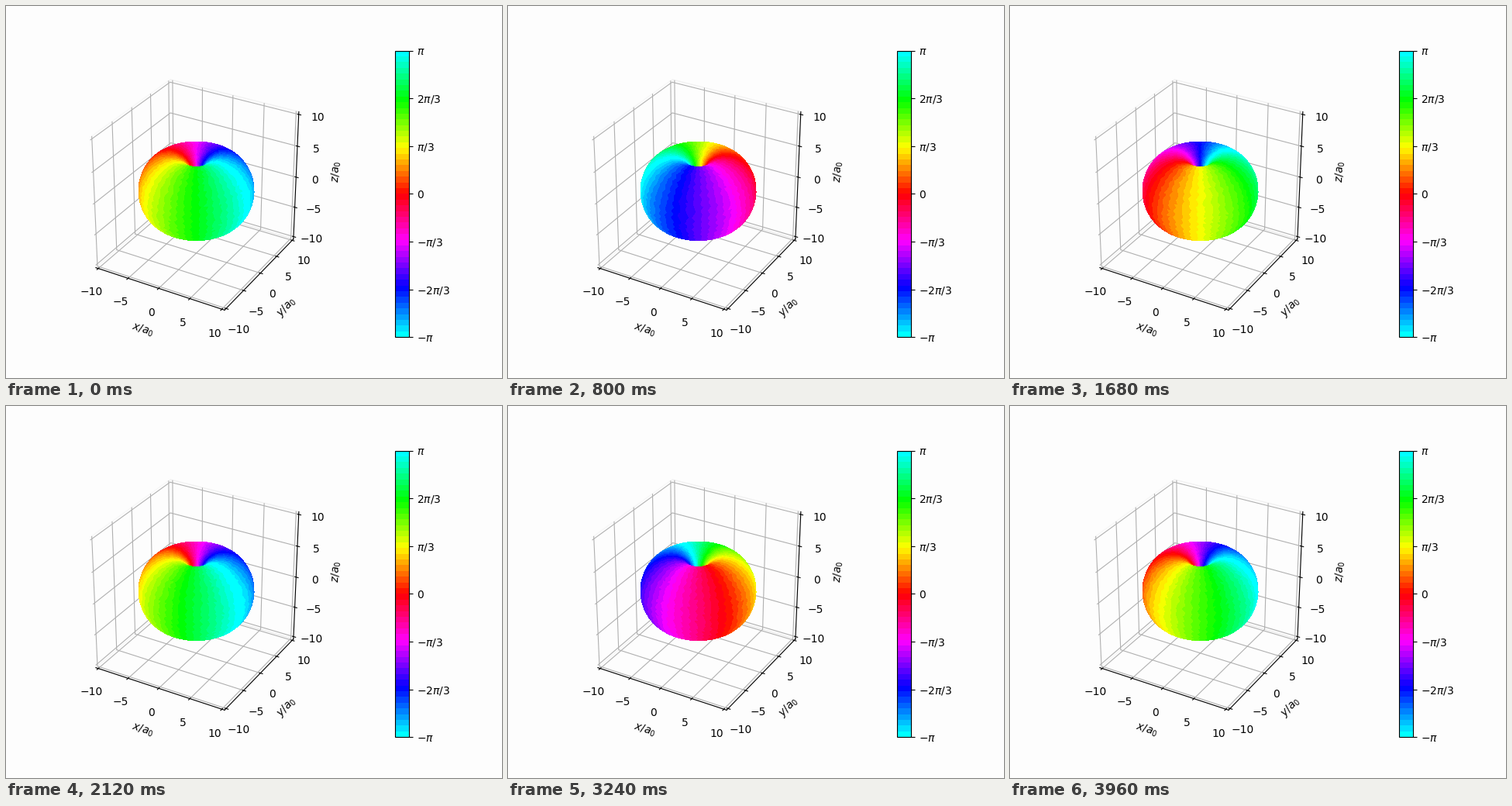
Recreate the animation shown at these times as a matplotlib script. Size 640x480 px, loop 4000 ms.

```python
import colorsys
import numpy as np
import matplotlib.pyplot as plt
from matplotlib.animation import FuncAnimation
from matplotlib.cm import ScalarMappable
from matplotlib.collections import PolyCollection
from matplotlib.colors import ListedColormap, Normalize
from mpl_toolkits.mplot3d import proj3d

PI = np.pi
FRAMES, INTERVAL = 100, 40
BG = "#fdfdfd"
LEVELS = 50
OUTER = 8.09          # outer radius of the 2p (m = 1) isosurface, in a0
ROWS, COLS = 60, 96

plt.rcParams["axes3d.automargin"] = True


def profile(n):
    """Closed contour r exp(-r/2) sin(theta) = c, evenly spaced, as (rho, z)."""
    c = OUTER * np.exp(-OUTER / 2)
    inner = c
    for _ in range(60):
        inner = c * np.exp(inner / 2)
    s = np.linspace(0, 2 * PI, 4001)
    r = inner + (OUTER - inner) * (1 - np.cos(s)) / 2
    sin = np.clip(c / r * np.exp(r / 2), 0, 1)
    rho = r * sin
    z = r * np.sqrt(1 - sin**2) * np.where(s < PI, 1, -1)
    dist = np.concatenate([[0], np.cumsum(np.hypot(np.diff(rho), np.diff(z)))])
    at = np.linspace(0, dist[-1], n + 1)
    return np.interp(at, dist, rho), np.interp(at, dist, z)


def build_mesh():
    """Triangles of the surface (n, 3, 3) and the azimuth of each."""
    rng = np.random.default_rng(4)
    jitter = rng.uniform(-0.25, 0.25, (ROWS, COLS))
    jitter = np.vstack([jitter, jitter[:1]])
    jitter = np.hstack([jitter, jitter[:, :1]])
    i, j = np.mgrid[0:ROWS + 1, 0:COLS + 1]
    phi = (j + 0.5 * (i % 2) + jitter) * 2 * PI / COLS
    rho, z = profile(ROWS)
    pts = np.stack([rho[:, None] * np.cos(phi), rho[:, None] * np.sin(phi),
                    z[:, None] + 0 * phi], axis=-1)

    faces = []
    for a in range(ROWS):
        for b in range(COLS):
            p, q = (a, b), (a, b + 1)
            u, v = (a + 1, b), (a + 1, b + 1)
            faces += [(p, u, v), (p, v, q)] if a % 2 else [(p, u, q), (q, u, v)]
    f = np.array(faces)
    return pts[f[..., 0], f[..., 1]], phi[f[..., 0], f[..., 1]].mean(axis=1)


def project(ax, tris):
    """Stage coordinates of the triangles."""
    x, y, _ = proj3d.proj_transform(*tris.reshape(-1, 3).T, ax.get_proj())
    xy = np.column_stack([np.asarray(x), np.asarray(y)])
    return ax.transData.transform(xy).reshape(-1, 3, 2)


def visible(tris, flat):
    """Indices of faces turned to the viewer, far ones first."""
    el, az = np.radians([30, -60])
    eye = [np.cos(el) * np.cos(az), np.cos(el) * np.sin(az), np.sin(el)]
    depth = tris.mean(axis=1) @ np.array(eye)
    d1, d2 = flat[:, 1] - flat[:, 0], flat[:, 2] - flat[:, 0]
    area = d1[:, 0] * d2[:, 1] - d1[:, 1] * d2[:, 0]
    front = area * np.sign(area[np.argmax(depth)]) > 0
    order = np.argsort(depth)
    return order[front[order]]


hues = np.linspace(-0.5, 0.5, LEVELS)
cmap = ListedColormap([colorsys.hsv_to_rgb(h % 1, 1, 1) for h in hues])

fig = plt.figure(figsize=(6.4, 4.8), dpi=100, facecolor=BG)
ax = fig.add_subplot(projection="3d", facecolor=BG)
ax.view_init(elev=30, azim=-60)
ax.set_box_aspect((1, 1, 1))
ticks = [-10, -5, 0, 5, 10]
ax.set(xlim=(-10, 10), ylim=(-10, 10), zlim=(-10, 10),
       xticks=ticks, yticks=ticks, zticks=ticks,
       xlabel="$x/a_0$", ylabel="$y/a_0$", zlabel="$z/a_0$")
for axis in (ax.xaxis, ax.yaxis, ax.zaxis):
    axis.pane.set_fill(False)

bar = fig.colorbar(ScalarMappable(Normalize(-PI, PI), cmap), ax=ax, pad=0.2,
                   ticks=np.linspace(-PI, PI, 7))
bar.ax.set_yticklabels([r"$-\pi$", r"$-2\pi/3$", r"$-\pi/3$", "$0$",
                        r"$\pi/3$", r"$2\pi/3$", r"$\pi$"])

fig.canvas.draw()
tris, azimuth = build_mesh()
flat = project(ax, tris)
keep = visible(tris, flat)
azimuth = azimuth[keep]

stage = fig.add_axes([0, 0, 1, 1])
stage.set(xlim=(0, 640), ylim=(0, 480))
stage.axis("off")
surface = PolyCollection(flat[keep], edgecolors="none", linewidths=0,
                         antialiaseds=False)
stage.add_collection(surface, autolim=False)


def update(k):
    # E = -1/8 hartree; the clock pauses for one frame at half time
    t = k - (k >= FRAMES // 2)
    phase = azimuth + PI + t / 8
    surface.set_facecolor(cmap((phase + PI) / (2 * PI) % 1))
    return [surface]


anim = FuncAnimation(fig, update, frames=FRAMES, interval=INTERVAL,
                     init_func=lambda: update(0), repeat=True, repeat_delay=0)
plt.show()
```
